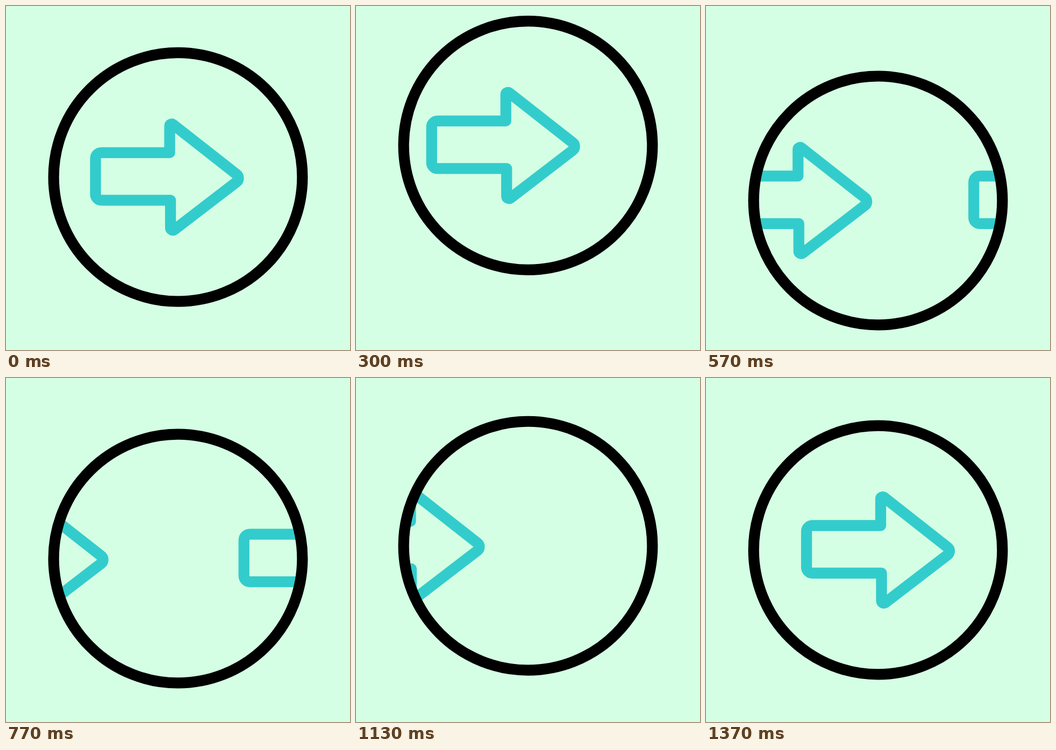
Animation of 640 by 640 pixels, one loop 1670 ms. Source, as an HTML page:

```html
<!DOCTYPE html>
<html lang="en">
<head>
<meta charset="utf-8">
<title>Next arrow</title>
<style>
  html, body { margin: 0; height: 100%; overflow: hidden; background: #d4ffe4; }
  svg { display: block; width: 100vw; height: 100vh; }
</style>
</head>
<body>
<svg viewBox="0 0 640 640">
  <defs>
    <clipPath id="disc"><circle cx="320" cy="320" r="231"/></clipPath>
    <path id="arrow" fill="none" stroke="#33cccc" stroke-width="20.3" stroke-linejoin="round"
      d="M325 274.5V225.2A3.9 3.9 0 0 1 331.3 222.1L449.5 314.9A9 9 0 0 1 449.4 329.1
         L333.7 417.9A4.5 4.5 0 0 1 326.5 414.3V363H198A11 11 0 0 1 187 352V285.5A11 11 0 0 1 198 274.5Z"/>
  </defs>
  <g id="button">
    <g clip-path="url(#disc)">
      <use id="leaving" href="#arrow"/>
      <use id="entering" href="#arrow"/>
    </g>
    <circle cx="320" cy="320" r="231.4" fill="none" stroke="#000" stroke-width="20.2"/>
  </g>
</svg>
<script>
const LOOP = 1670, STEP = 100 / 3, LAST = 41;

// Keys are [step, value]; steps run at 30 per second.
const bounceKeys = [[-1.1, 0], [7.65, -62.2], [8, -62.2], [18.55, 46], [29, -36], [36.5, 0]];
const slideSteps = [-3.3, 6.15, 18.75, 27.49, 41];
const slideKeys = values => values.map((value, i) => [slideSteps[i], value]);
const leavingKeys = slideKeys([0, -85, 325, 179, 598]);
const enteringKeys = slideKeys([-465, -550, -140, -419, 0]);

// Symmetric cubic Bezier ease, solved by bisection.
function ease(x, handle = 0.46) {
  let low = 0, high = 1, s = 0.5;
  for (let i = 0; i < 24; i++) {
    s = (low + high) / 2;
    const r = 1 - s;
    if (3 * r * r * s * handle + 3 * r * s * s * (1 - handle) + s ** 3 < x) low = s;
    else high = s;
  }
  return s * s * (3 - 2 * s);
}

function valueAt(keys, step) {
  const next = keys.findIndex(key => key[0] > step);
  if (next < 0) return keys[keys.length - 1][1];
  const [t0, v0] = keys[next - 1], [t1, v1] = keys[next];
  return v0 + (v1 - v0) * ease((step - t0) / (t1 - t0));
}

function move(id, x, y) {
  document.getElementById(id).setAttribute("transform", `translate(${x} ${y})`);
}

function draw(time) {
  const step = Math.min(LAST, Math.floor((time % LOOP + 5) / STEP));
  move("button", 0, valueAt(bounceKeys, step));
  move("leaving", valueAt(leavingKeys, step), 0);
  move("entering", valueAt(enteringKeys, step), 0);
}

const start = performance.now();
function tick() {
  draw(performance.now() - start);
  requestAnimationFrame(tick);
}
tick();
</script>
</body>
</html>
```
